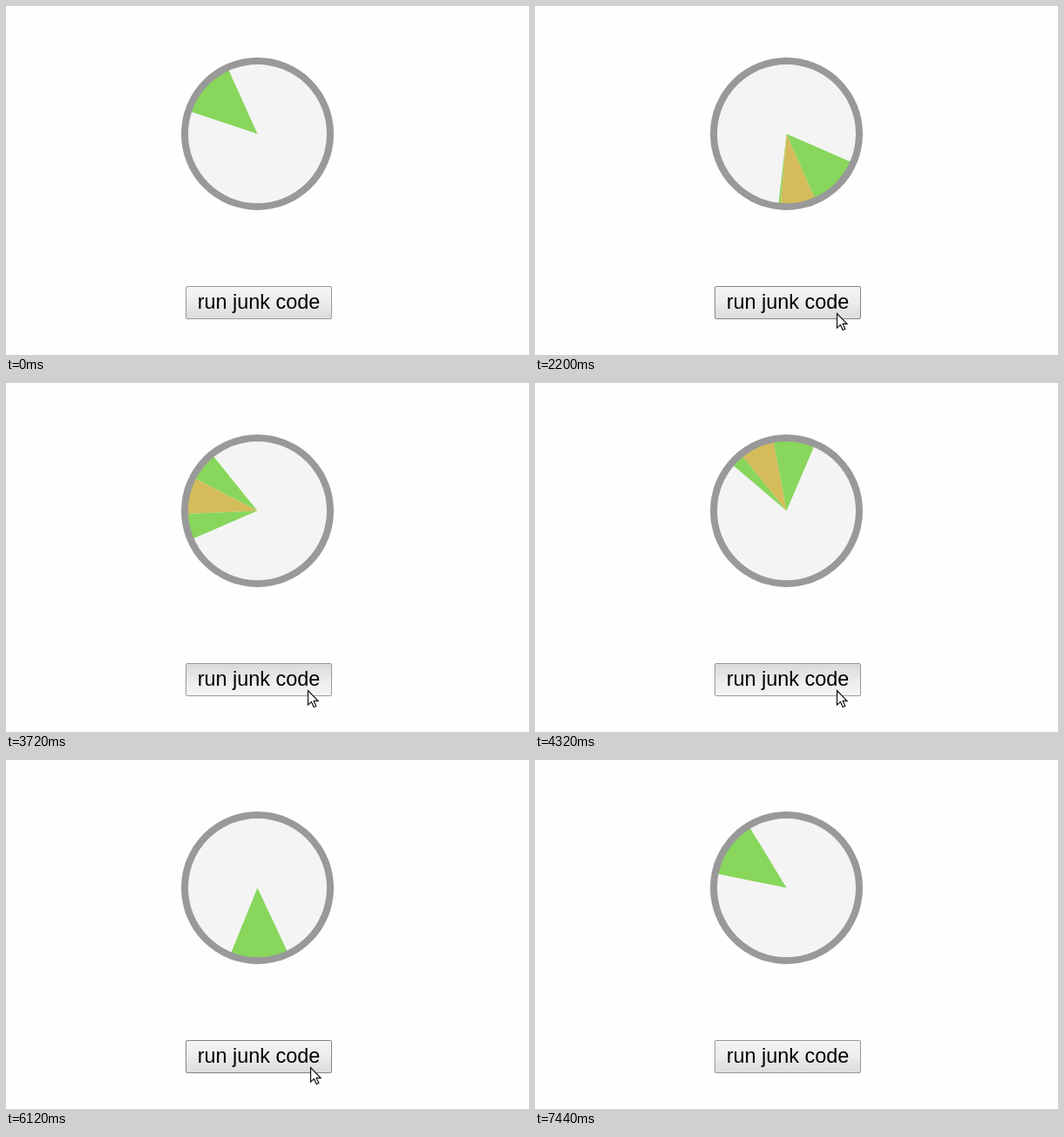
Animation of 600 by 400 pixels, one loop 7.48 s. Source, as an HTML page:

```html
<!DOCTYPE html>
<html lang="en">
<head>
<meta charset="utf-8">
<title>Run junk code</title>
<style>
html, body { margin: 0; width: 100%; height: 100%; overflow: hidden; background: #fefefe; }
svg { display: block; width: 600px; height: 400px; }
text { font: 23.4px "Liberation Sans", Arial, sans-serif; }
</style>
</head>
<body>
<svg viewBox="0 0 600 400">
  <defs>
    <linearGradient id="up" x2="0" y2="1">
      <stop stop-color="#f5f5f5"/><stop offset=".4" stop-color="#eee"/><stop offset="1" stop-color="#dcdcdc"/>
    </linearGradient>
    <linearGradient id="down" x2="0" y2="1">
      <stop stop-color="#d9d9d9"/><stop offset=".6" stop-color="#eee"/><stop offset="1" stop-color="#f4f4f4"/>
    </linearGradient>
  </defs>
  <circle cx="288.5" cy="146.5" r="83" fill="#f4f4f4"/>
  <g id="trail"></g>
  <circle cx="288.5" cy="146.5" r="83.5" fill="none" stroke="#999" stroke-width="8"/>
  <rect id="button" x="206.5" y="321.5" width="167" height="37" rx="1.5" stroke="#999"/>
  <text x="290" y="347" text-anchor="middle">run junk code</text>
  <path id="cursor" d="M.5 .5V17L4.4 13.4L7.2 19.5L9.8 18.3L7.1 12.4H12Z" fill="#fff" stroke="#111" stroke-width="1.2"/>
</svg>
<script>
const LOOP = 7480, STEP = 40;
const SPEED = 0.09584, START = 335.6;   // degrees per ms, leading edge at 0 ms
const TRAIL = 493, FRAME = 30;          // ms of trail, and what a blocked frame uses of it
const BLOCKS = [[1885, 2182], [3046, 3358], [3604, 3900], [4253, 4870]];
const CURSOR = [
  [440, 424, 400], [760, 424, 373], [840, 422, 369], [1040, 422, 364], [1120, 422, 364],
  [1520, 346, 352], [6040, 346, 352], [6120, 349, 352], [6280, 368, 361]
];
const [trail, button, cursor] = ["trail", "button", "cursor"].map(id => document.getElementById(id));

function wedge(from, to, color) {
  const point = time => {
    const a = (START + time * SPEED) * Math.PI / 180;
    return `${288.5 + 82 * Math.sin(a)} ${146.5 - 82 * Math.cos(a)}`;
  };
  return `<path fill="${color}" d="M288.5 146.5L${point(from)}A82 82 0 0 1 ${point(to)}Z"/>`;
}

// Time of the last painted dial while the page is blocked
function dialTime(t) {
  const block = BLOCKS.find(([from, to]) => t >= from && t < to);
  if (!block) return t;
  return t < block[1] - FRAME ? block[0] : block[1];
}

function drawTrail(now) {
  let left = TRAIL, end = now, shapes = "";
  for (const [from, to] of BLOCKS.filter(b => b[1] <= now).reverse()) {
    if (end - to >= left) break;
    shapes += wedge(to, end, "#88d65c") + wedge(from, to, to - from > 500 ? "#d85a5a" : "#d4bc5a");
    left -= end - to + FRAME;
    end = from;
    if (left <= 0) break;
  }
  if (left > 0) shapes += wedge(end - left, end, "#88d65c");
  trail.innerHTML = shapes;
}

function drawCursor(t) {
  const i = CURSOR.findIndex(key => key[0] > t);
  cursor.style.display = i > 0 ? "" : "none";
  if (i < 1) return;
  const [t0, x0, y0] = CURSOR[i - 1], [t1, x1, y1] = CURSOR[i];
  const k = (t - t0) / (t1 - t0);
  cursor.setAttribute("transform", `translate(${x0 + (x1 - x0) * k} ${y0 + (y1 - y0) * k})`);
}

function draw(now) {
  const t = Math.floor(now % LOOP / STEP) * STEP;
  const pressed = BLOCKS.some(([from, to]) => t >= from - 80 && t < to - FRAME);
  const hover = t >= 1440 && t < 6200;
  drawTrail(dialTime(t));
  drawCursor(t);
  button.setAttribute("fill", pressed ? "url(#down)" : "url(#up)");
  button.setAttribute("stroke", hover && !pressed ? "#858585" : "#999");
}

const begin = performance.now();
function tick() {
  draw(performance.now() - begin);
  requestAnimationFrame(tick);
}
tick();
</script>
</body>
</html>
```
